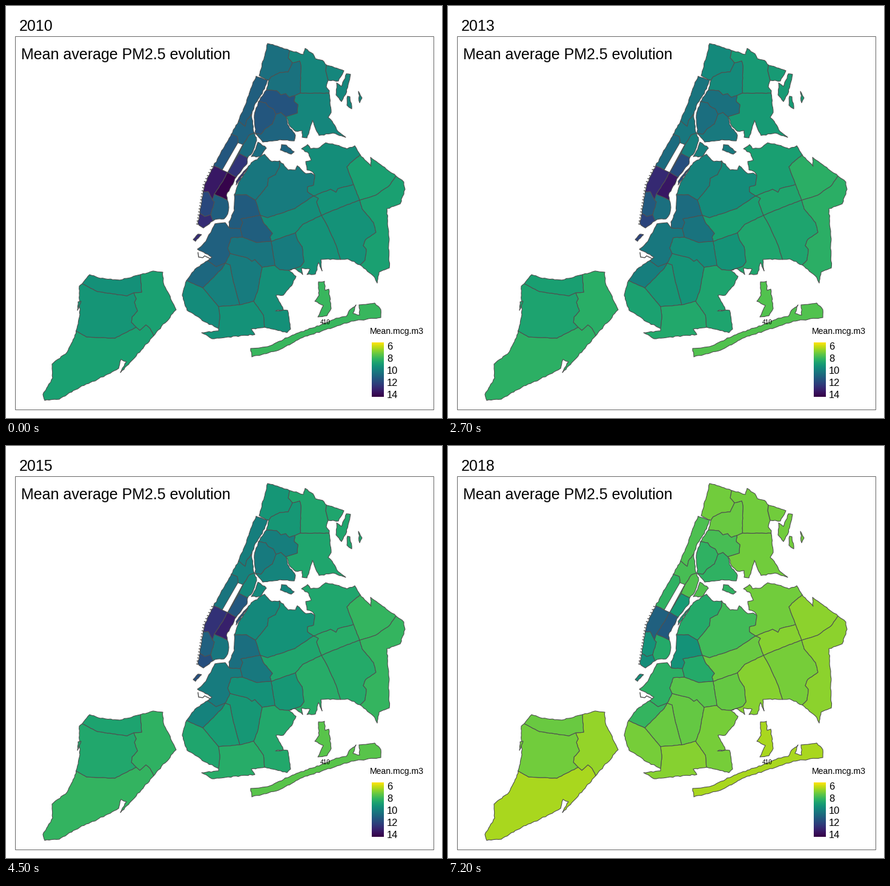
A matplotlib script that plays this animation: 720 px wide and 681 px high, repeating every 8 s.

```python
import numpy as np
import matplotlib.pyplot as plt
from matplotlib.animation import FuncAnimation
from matplotlib.collections import LineCollection
from matplotlib.colors import ListedColormap
from matplotlib.patches import Polygon, Rectangle

W, H, DPI = 720, 681, 64
PX = 72 / DPI  # points per pixel
STEP, FRAMES, HOLD = 100, 80, 9
EDGE = "#4f4f4f"

# Position of each year 2010-2018 along the six shade stops of a region.
PACE = [0, 1, 2, 2.5, 3, 3.15, 4, 4.35, 5]

# Per borough: relative dip in 2011, then progress in 2012, 2014 and 2016.
BRONX = .22, .22, .33, .84
MANHATTAN = .13, .23, .24, .87
QUEENS = .1, .24, .27, .84
BROOKLYN = .11, .32, .27, .83
STATEN = .09, .25, .2, .82
BEACH = .08, .33, .22, 1.05

plt.rcParams["font.family"] = "Liberation Sans"
rng = np.random.default_rng(4)
base = plt.get_cmap("viridis")(np.linspace(0, 1, 512))
base[:, :3] **= 1.2
cmap = ListedColormap(base)

fig = plt.figure(figsize=(W / DPI, H / DPI), dpi=DPI, facecolor="white")
ax = fig.add_axes([0, 0, 1, 1])
ax.axis("off")

regions = []


def roughen(points, amount):
    """Subdivide a line and shake the inserted points."""
    out = []
    for a, b in zip(points[:-1], points[1:]):
        n = max(1, round(np.hypot(*(b - a)) / 4))
        part = a + (b - a) * np.arange(n)[:, None] / n
        part[1:] += rng.uniform(-amount, amount, (n - 1, 2))
        out.append(part)
    return np.vstack(out)


def land(*flat):
    ring = np.reshape(flat, (-1, 2)).astype(float)
    return roughen(np.vstack([ring, ring[:1]]), .8)


def cut(ring, *flat):
    """Split a clockwise ring along a line into its left and right parts."""
    line = np.reshape(flat, (-1, 2)).astype(float)
    i, j = (np.hypot(*(ring - p).T).argmin() for p in (line[0], line[-1]))
    line[0], line[-1] = ring[i], ring[j]
    line = np.vstack([roughen(line, .35), line[-1:]])[1:-1]
    turn = np.roll(ring, -i, axis=0)
    k = (j - i) % len(ring)
    left = np.vstack([turn[:k + 1], line[::-1]])
    right = np.vstack([turn[k:], turn[:1], line])
    return left, right


def area(borough, first, last, *rings):
    """Draw a region that goes from its first to its last shade, in percent."""
    dip, *progress = borough
    stops = [first, first * (1 - dip)]
    stops += [first + p * (last - first) for p in progress] + [last]
    shades = np.interp(PACE, range(6), stops) / 100
    for ring in rings:
        shape = Polygon(ring, closed=True, ec=EDGE, lw=1.1 * PX,
                        joinstyle="round")
        ax.add_patch(shape)
        regions.append((shape, shades))


def label(x, y, text, size):
    return ax.text(x, y, text, size=size * PX, va="baseline", color="black")


def draw_bronx():
    whole = land(432, 62, 491, 80, 494, 70, 507, 79, 511, 87, 523, 90, 530, 98,
                 558, 107, 549, 124, 532, 123, 529, 134, 534, 140, 537, 176,
                 532, 184, 539, 191, 548, 207, 561, 217, 540, 210, 517, 214,
                 506, 189, 497, 218, 489, 217, 489, 206, 478, 207, 470, 200,
                 462, 183, 465, 196, 478, 214, 476, 223, 452, 221, 424, 225,
                 412, 211, 410, 180, 417, 158, 430, 139, 434, 123, 418, 115)
    east, west = cut(whole, 468, 76, 466, 86, 473, 94, 485, 91, 487, 99,
                     486, 144, 477, 148, 476, 158, 482, 163, 481, 177, 462, 183)
    northeast, southeast = cut(east, 486, 144, 533, 146)
    north, south = cut(west, 430, 139, 447, 140, 454, 147, 462, 145, 468, 151,
                       477, 148)
    hill, park = cut(north, 434, 123, 438, 117, 452, 110, 466, 109, 473, 94)
    centre, south = cut(south, 417, 158, 429, 160, 433, 166, 441, 170, 446, 179,
                        454, 176, 462, 183)
    bridge, point = cut(south, 412, 211, 421, 212, 427, 204, 440, 195, 446, 179)
    isles = [land(562, 112, 569, 113, 565, 130, 561, 146, 554, 158, 545, 147,
                  546, 127, 554, 133),
             land(564, 149, 568, 150, 571, 170, 563, 164),
             land(582, 141, 588, 152, 584, 160)]
    rock = land(455, 229, 463, 230, 476, 241, 471, 245, 453, 238)
    area(BRONX, 52, 81, northeast, southeast, *isles)
    area(BRONX, 43, 81, hill)
    area(BRONX, 44, 80, park)
    area(BRONX, 32, 74, centre)
    area(BRONX, 33, 69, bridge)
    area(BRONX, 39, 69, point, rock)


def draw_manhattan():
    whole = land(413, 116, 432, 122, 427, 137, 410, 165, 406, 178, 408, 203,
                 414, 222, 407, 242, 399, 251, 398, 261, 380, 283, 364, 313,
                 368, 333, 366, 344, 360, 352, 345, 353, 326, 367, 317, 360,
                 322, 331, 328, 295, 343, 264, 372, 212, 384, 190, 394, 166,
                 404, 137)
    heights, rest = cut(whole, 384, 190, 395, 199, 397, 190, 407, 177)
    up, low = cut(rest, 343, 264, 366, 275, 380, 283)
    up, west = cut(up, 372, 212, 382, 216, 383, 226, 357, 271)
    up, east = cut(up, 366, 275, 385, 244, 399, 251)
    north, harbour = cut(up, 385, 244, 391, 230, 402, 213, 411, 212)
    mid, low = cut(low, 326, 306, 334, 307, 341, 321, 344, 311, 364, 322)
    dark, square = cut(mid, 366, 275, 358, 290, 344, 311)
    lower_east, low = cut(low, 341, 321, 344, 324, 338, 345, 342, 355)
    village, tip = cut(low, 320, 343, 328, 348, 338, 345)
    area(MANHATTAN, 36, 75, heights)
    area(MANHATTAN, 38, 74, north)
    area(MANHATTAN, 42, 76, harbour,
         land(416, 225, 430, 235, 420, 249, 405, 249, 410, 240))
    area(MANHATTAN, 33, 69, west)
    area(MANHATTAN, 20, 60, east, land(402, 264, 380, 296, 380, 290, 392, 274))
    area(MANHATTAN, 10, 37, square)
    area(MANHATTAN, 2, 34, dark)
    area(MANHATTAN, 36, 66, lower_east)
    area(MANHATTAN, 27, 57, village)
    area(MANHATTAN, 17, 55, tip, land(309, 386, 317, 377, 323, 378, 313, 389))
    green = [(383, 226), (391, 229), (366, 275), (357, 271)]
    ax.add_patch(Polygon(green, fc="white", ec=EDGE, lw=PX))


def draw_queens(queens):
    west, rest = cut(queens, 420, 346, 432, 350, 477, 335, 508, 314, 498, 307,
                     498, 299, 508, 296, 510, 280)
    shore, west = cut(west, 412, 321, 432, 297, 433, 285, 445, 279, 452, 265,
                      452, 256)
    rest, ridge = cut(rest, 508, 314, 516, 318, 513, 324, 521, 346, 490, 361,
                      478, 375)
    east, rest = cut(rest, 585, 246, 568, 260, 563, 266, 574, 295, 584, 321,
                     588, 335, 607, 358, 611, 374, 594, 386, 590, 396, 595, 402,
                     593, 420, 585, 428)
    bay, east = cut(east, 584, 321, 610, 313, 633, 297, 644, 281)
    north, rest = cut(rest, 508, 314, 536, 303, 545, 308, 548, 302, 574, 295)
    meadow, rest = cut(rest, 521, 346, 560, 330, 584, 321)
    south, southwest = cut(rest, 521, 346, 530, 362, 545, 395, 552, 418)
    area(QUEENS, 46, 66, shore)
    area(QUEENS, 48, 73, west)
    area(QUEENS, 55, 80, ridge)
    area(QUEENS, 55, 81, north)
    area(QUEENS, 57, 84, meadow, southwest)
    area(QUEENS, 57, 82, south)
    area(QUEENS, 62, 85, bay, east)


def draw_brooklyn(brooklyn):
    tip, rest = cut(brooklyn, 369, 367, 387, 368, 391, 358, 388, 352, 420, 346)
    bush, rest = cut(rest, 387, 368, 390, 382, 414, 391, 438, 389)
    east, rest = cut(rest, 438, 389, 444, 429, 452, 436, 467, 437)
    top, rest = cut(rest, 333, 421, 347, 431, 362, 425, 370, 409, 398, 416,
                    406, 422, 411, 419, 423, 432, 444, 429)
    heights, downtown = cut(top, 390, 382, 372, 383, 366, 400, 370, 409)
    flats, rest = cut(rest, 423, 432, 416, 470, 409, 488, 425, 511, 427, 531)
    mid, shore = cut(rest, 298, 454, 325, 466, 351, 497, 386, 494, 409, 488)
    sunset, mid = cut(mid, 325, 466, 357, 434, 362, 425)
    field, park = cut(mid, 362, 425, 370, 428, 376, 458, 386, 494)
    beach, ridge = cut(shore, 351, 497, 353, 515, 351, 533)
    area(BROOKLYN, 35, 57, tip)
    area(BROOKLYN, 36, 66, bush)
    area(BROOKLYN, 48, 79, east, field)
    area(BROOKLYN, 45, 77, heights)
    area(BROOKLYN, 37, 68, downtown)
    area(BROOKLYN, 56, 82, flats)
    area(BROOKLYN, 40, 70, sunset)
    area(BROOKLYN, 50, 80, park)
    area(BROOKLYN, 57, 84, beach)
    area(BROOKLYN, 54, 82, ridge)


def draw_long_island():
    north = [427, 245, 439, 257, 452, 256, 466, 271, 478, 271, 481, 264,
             495, 277, 504, 276, 510, 280, 506, 274, 497, 271, 495, 257,
             504, 255, 500, 244, 488, 236, 498, 229, 503, 236, 516, 235,
             528, 226, 546, 230, 563, 236, 576, 231, 585, 246, 603, 265,
             602, 250, 644, 281, 657, 291, 659, 303, 651, 327, 629, 335,
             632, 380, 633, 433, 616, 440, 613, 458, 609, 449, 585, 428,
             564, 418]
    south = [520, 419, 522, 438, 516, 424, 511, 443, 497, 444, 502, 435,
             488, 433, 490, 444, 477, 434, 467, 437, 479, 447, 472, 462,
             458, 478, 446, 478, 458, 502, 445, 504, 465, 503, 470, 534,
             464, 540, 427, 531, 405, 534, 411, 543, 340, 550, 323, 540,
             351, 537, 351, 533, 328, 522, 299, 503, 291, 478, 298, 454,
             312, 435, 333, 421, 340, 415, 316, 402, 330, 389, 345, 360,
             362, 358, 369, 367, 368, 357, 377, 338, 377, 312, 384, 292,
             405, 259]
    queens, brooklyn = cut(land(*north, *south), 377, 312, 397, 312, 412, 321,
                           420, 346, 425, 358, 440, 376, 436, 382, 438, 389,
                           478, 375, 482, 388, 489, 398, 492, 423, 487, 430,
                           467, 437)
    draw_queens(queens)
    draw_brooklyn(brooklyn)
    strip = land(404, 566, 432, 563, 480, 541, 520, 527, 545, 516, 562, 513,
                 567, 503, 578, 494, 573, 508, 584, 511, 583, 494, 609, 491,
                 619, 502, 619, 515, 570, 521, 490, 548, 450, 569, 406, 580)
    channel = land(516, 456, 526, 455, 527, 470, 533, 468, 537, 500, 530, 512,
                   515, 514, 524, 495, 510, 488, 517, 478)
    area(BEACH, 71, 89, strip, channel)


def draw_staten():
    whole = land(126, 459, 138, 444, 152, 449, 188, 453, 222, 444, 243, 438,
                 259, 440, 260, 458, 281, 502, 244, 545, 210, 584, 189, 606,
                 199, 588, 190, 584, 186, 599, 150, 618, 125, 628, 88, 650,
                 64, 652, 61, 642, 77, 615, 76, 592, 101, 572, 113, 548,
                 122, 510, 121, 463)
    north, south = cut(whole, 116, 537, 133, 547, 180, 549, 215, 531, 221, 536,
                       231, 527, 238, 533, 244, 545)
    east, north = cut(north, 222, 444, 224, 473, 211, 474, 215, 484, 212, 490,
                      217, 504, 208, 514, 207, 523, 215, 531)
    port, middle = cut(north, 126, 459, 151, 472, 200, 479, 211, 474)
    area(STATEN, 62, 89, south)
    area(STATEN, 62, 86, east)
    area(STATEN, 58, 81, middle, land(119, 489, 124, 488, 118, 503))
    area(STATEN, 56, 80, port)


draw_bronx()
draw_manhattan()
draw_long_island()
draw_staten()

# Piers along the west shore, a breakwater and a creek
levels = np.arange(266, 362, 5)
shore = np.interp(levels, [264, 295, 331, 362], [343, 328, 322, 317])
details = [[(x, y), (x - 3, y - 1)] for x, y in zip(shore, levels)]
details += [[(317, 407), (318, 415), (325, 416), (328, 413), (338, 418)],
            [(529, 98), (528, 107), (532, 123)]]
ax.add_collection(LineCollection(details, colors=EDGE, linewidths=1.4 * PX))

# Frame, labels and legend
ax.add_patch(Rectangle((14.5, 50), 691, 617, fill=False, ec="#666666", lw=PX))
year = label(21.5, 41, "", 25)
label(25, 88, "Mean average PM2.5 evolution", 25)
label(519, 526, "410", 10)
label(601, 542, "Mean.mcg.m3", 14)
ax.imshow(np.linspace(1, 0, 256)[:, None], cmap=cmap, vmin=0, vmax=1,
          extent=(604, 624, 646, 556), aspect="auto")
for i, level in enumerate(range(6, 15, 2)):
    label(629, 568.5 + 20 * i, str(level), 16.5)

ax.set_xlim(0, W)
ax.set_ylim(H, 0)


def update(frame):
    n = frame // HOLD
    year.set_text(str(2010 + n))
    for shape, shades in regions:
        shape.set_facecolor(cmap(shades[n]))
    return []


anim = FuncAnimation(fig, update, frames=FRAMES, interval=STEP, repeat=True,
                     repeat_delay=0, init_func=lambda: update(0))
plt.show()
```
